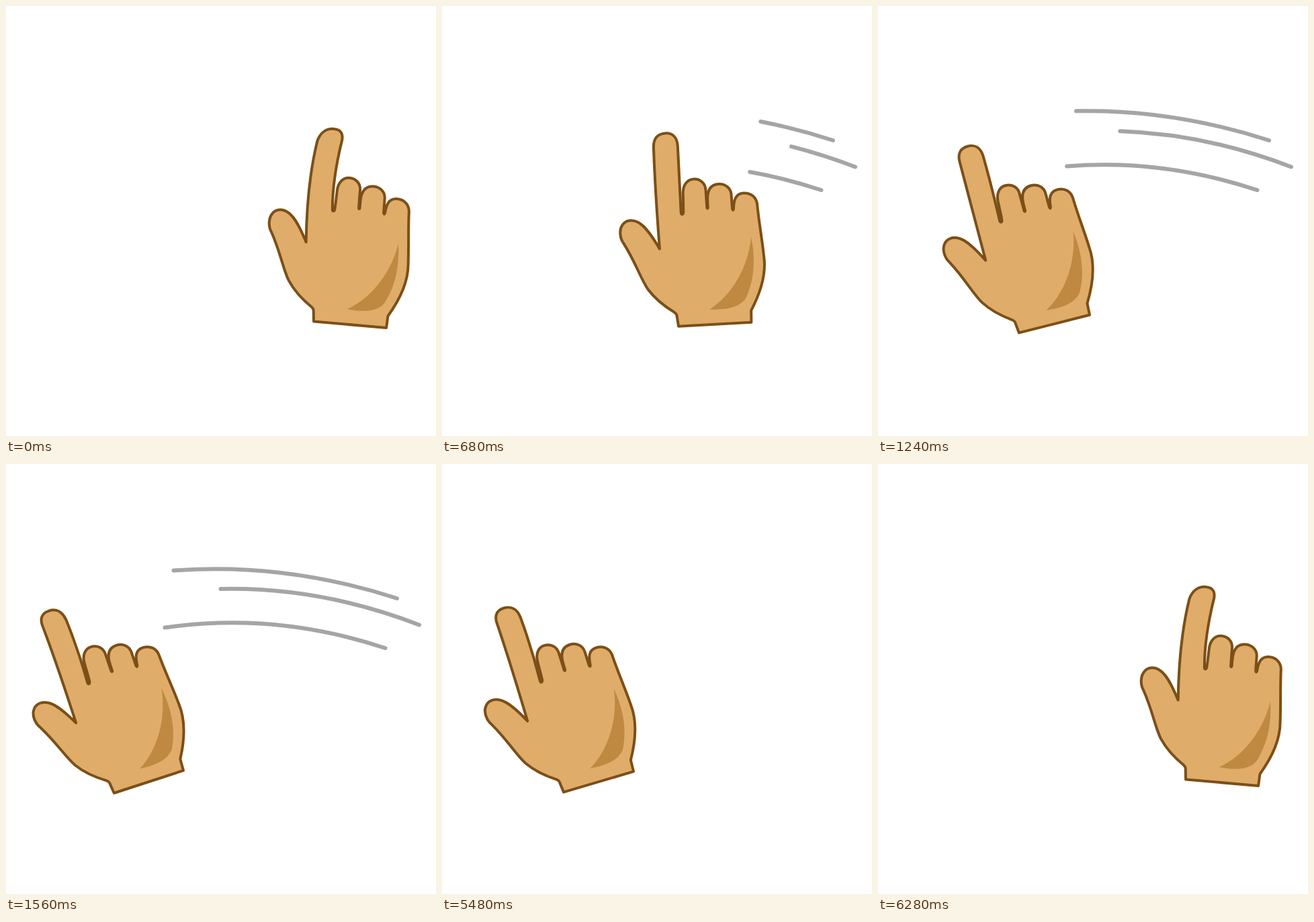
An HTML page for the animation above (6340 ms loop, 640 by 640 pixels).

```html
<!DOCTYPE html>
<html lang="en">
<head>
<meta charset="utf-8">
<title>Swipe gesture</title>
<style>
  html, body { margin: 0; width: 100%; height: 100%; overflow: hidden; background: #fff; }
  svg { display: block; width: 100%; height: 100%; }
</style>
</head>
<body>
<svg viewBox="0 0 640 640">
  <g id="trails" fill="none" stroke="#a5a5a5" stroke-width="6" stroke-linecap="round">
    <path pathLength="1" d="M582 200Q415.5 146 249.5 158.5"/>
    <path pathLength="1" d="M615 239.5Q467 182.5 319.5 186"/>
    <path pathLength="1" d="M564.5 274Q400.5 219.5 236.5 243.5"/>
  </g>
  <g id="hand">
    <path id="outline" fill="#e0ac69" stroke="#7b4f17" stroke-width="4" stroke-linejoin="round"/>
    <path fill="#bf8942" d="M522 348C527 385 521 415 508 438C498 452 476 454 453 451C486 434 515 393 522 348Z"/>
  </g>
</svg>
<script>
const LOOP = 6340;
const WRIST = { x: 405, y: 473 };
const OUTLINE = `M405 473L403.5 456.5Q403 454 400.5 452C385 441 373 430 363.5 415
  C353.5 398 348.5 375 332.5 345C327 337 326.5 324 332 317C337 310 347 309 355 314
  C366 320 376 338 385 356C384.5 300 385 250 386.5 205
  C387 191 394.5 185 405 185C416 185 422.5 192 422.5 205
  C422 240 421 270 420.5 304C420.5 308 423.5 308 424 304
  C425 292 425 284 425.5 276C426 264 433 256 442 256C452 256 459.5 263 459.5 273
  L459.5 300Q460.5 302 461 300C461 291 461 285 462 281C464 271 470 266 479 266
  C489 266 497 273 497 283L497 304Q498 308 499 304C500 292 503 282 515 282
  C527 282 534 290 534.5 300C535 325 538 350 539 378C541 405 530 432 514.5 457L513.5 474.5Z`;
// [step, sideways shift of the fingertip]
const BEND = [[0, 9], [4, 0], [9, 0], [14, -4.5], [21, -6], [48, -6], [49, -4], [51, 0], [53, 0], [56, 9]];

const hand = document.getElementById('hand');
const outline = document.getElementById('outline');
const trails = document.getElementById('trails');

const lerp = (a, b, t) => a + (b - a) * t;
const span = (n, from, to) => Math.min(1, Math.max(0, (n - from) / (to - from)));
const smooth = t => t * t * (3 - 2 * t);

// The picture holds on uneven steps, five to every 560 ms.
function stepAt(ms) {
  const shifted = ms + 120;
  const rest = shifted % 560;
  return 5 * Math.floor(shifted / 560) - 1 + [120, 240, 380, 420].filter(s => rest >= s).length;
}

function bendAt(n) {
  const i = BEND.findIndex(key => key[0] >= n);
  if (i < 1) return BEND[0][1];
  const [from, a] = BEND[i - 1], [to, b] = BEND[i];
  return lerp(a, b, span(n, from, to));
}

// The index finger arches: its tip moves one way, its middle slightly the other.
function bentOutline(bend) {
  return OUTLINE.replace(/([\d.]+) ([\d.]+)/g, (pair, x, y) => {
    if (x < 384 || x > 423 || y > 300) return pair;
    const u = (356 - y) / 171;
    return `${+x + bend * (2.2 * u ** 3 - 1.2 * u)} ${y}`;
  });
}

function swipeAt(n) {
  if (n < 48) return smooth(span(n, 0, 15));
  const t = span(n, 48, 56);
  return 1 - lerp(smooth(t), t, 0.45);
}

function draw(ms) {
  const n = stepAt(ms);
  const p = swipeAt(n);
  hand.setAttribute('transform',
    `translate(${lerp(458, 157, p)} ${lerp(469.5, 490, p)}) rotate(${lerp(4.2, -19.1, p)}) translate(${-WRIST.x} ${-WRIST.y})`);
  outline.setAttribute('d', bentOutline(bendAt(n)));

  const head = smooth(span(n, 1, 14));
  const tail = smooth(span(n, 14, 23));
  trails.style.display = head > tail ? '' : 'none';
  trails.setAttribute('stroke-dasharray', `${head - tail} 2`);
  trails.setAttribute('stroke-dashoffset', -tail);
}

const start = performance.now();
function tick() {
  draw((performance.now() - start) % LOOP);
  requestAnimationFrame(tick);
}
tick();
</script>
</body>
</html>
```
